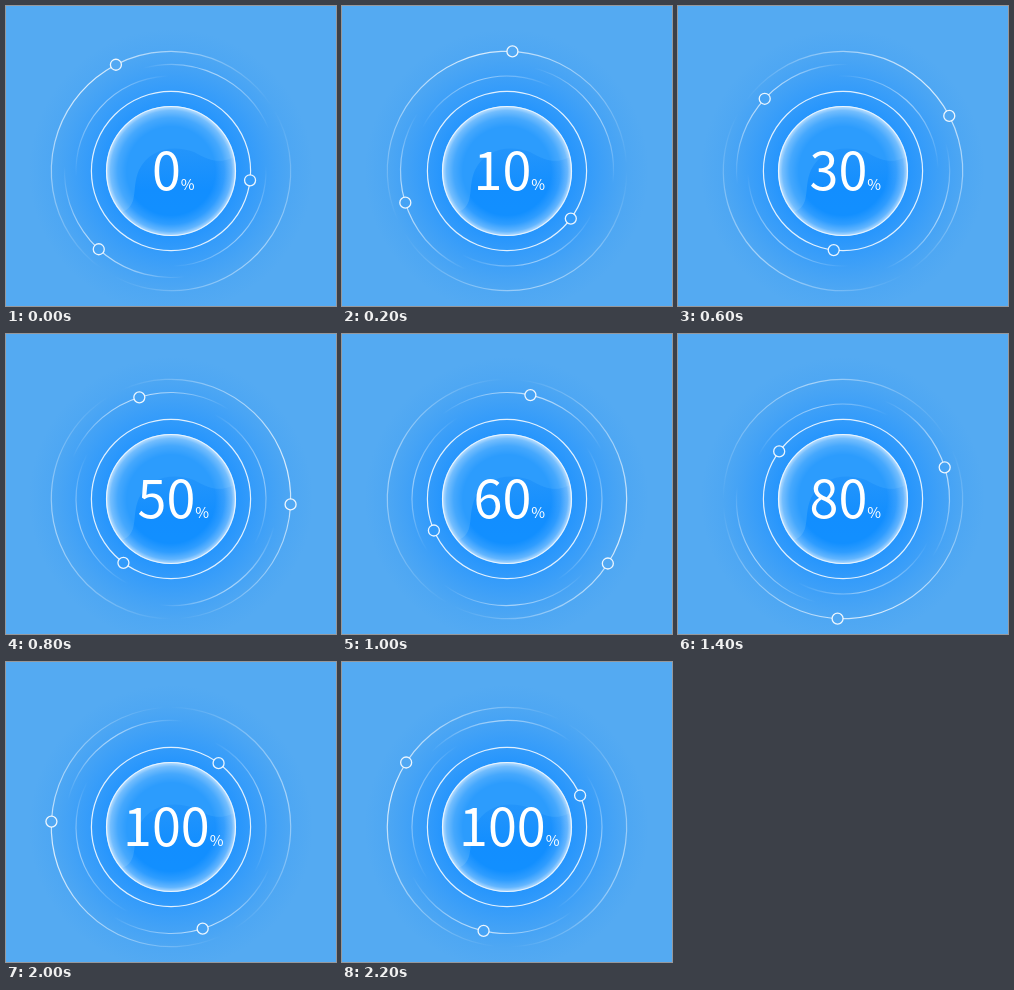
An HTML page with a canvas for the animation above (2600 ms loop, 330 by 300 pixels).

```html
<!DOCTYPE html>
<html lang="en">
<head>
<meta charset="utf-8">
<title>Progress orb</title>
<style>
html, body { margin: 0; width: 100%; height: 100%; overflow: hidden; background: #54aaf2; }
canvas { display: block; }
</style>
</head>
<body>
<canvas id="stage" width="330" height="300"></canvas>
<script>
const ctx = document.getElementById('stage').getContext('2d');
const C = 165, TAU = Math.PI * 2;
const LOOP = 2600, STEP = 200, LAST = 11;
const FONT = '"Noto Sans CJK SC", "Noto Sans CJK JP", "Noto Sans", sans-serif';
const rad = deg => deg * Math.PI / 180;
const white = a => `rgba(255,255,255,${a})`;

function radial(stops, r) {
  const g = ctx.createRadialGradient(C, C, 0, C, C, r);
  for (const [at, color] of stops) g.addColorStop(at, color);
  return g;
}

function disc(r, fill) {
  ctx.beginPath();
  ctx.arc(C, C, r, 0, TAU);
  ctx.fillStyle = fill;
  ctx.fill();
}

// Arc that is brightest in the middle and fades out at both ends.
function fadeArc(r, from, to, alpha) {
  const span = (to - from) / 360;
  const g = ctx.createConicGradient(rad(from), C, C);
  g.addColorStop(0, white(0));
  g.addColorStop(span * 0.28, white(alpha * 0.6));
  g.addColorStop(span * 0.5, white(alpha));
  g.addColorStop(span * 0.72, white(alpha * 0.6));
  g.addColorStop(span, white(0));
  ctx.beginPath();
  ctx.arc(C, C, r, rad(from), rad(to));
  ctx.strokeStyle = g;
  ctx.lineWidth = 1.2;
  ctx.stroke();
}

function dot(r, deg, fill) {
  ctx.beginPath();
  ctx.arc(C + r * Math.cos(rad(deg)), C + r * Math.sin(rad(deg)), 5.5, 0, TAU);
  ctx.fillStyle = fill;
  ctx.fill();
  ctx.strokeStyle = white(0.9);
  ctx.lineWidth = 1.3;
  ctx.stroke();
}

function rings(turn) {
  const outer = 242.6 + turn, mid = 132.7 + turn, inner = 6.7 + turn;
  fadeArc(119.7, outer - 117, outer + 84, 0.8);
  fadeArc(119.7, outer + 87, outer + 236, 0.5);
  fadeArc(106.5, mid - 50, mid + 50, 0.7);
  fadeArc(106.5, mid + 122, mid + 204, 0.55);
  fadeArc(95, mid + 44, mid + 136, 0.48);
  fadeArc(95, mid - 136, mid - 44, 0.48);
  ctx.beginPath();
  ctx.arc(C, C, 79.6, 0, TAU);
  ctx.strokeStyle = white(0.85);
  ctx.lineWidth = 1.2;
  ctx.stroke();
  dot(119.7, outer, '#51a8f3');
  dot(106.5, mid, '#46a3f5');
  dot(79.6, inner, '#329bfa');
}

function orb() {
  disc(65, '#2c9cfd');
  ctx.save();
  ctx.beginPath();
  ctx.arc(C, C, 65, 0, TAU);
  ctx.clip();
  ctx.beginPath();
  ctx.moveTo(108, 208);
  ctx.bezierCurveTo(136, 204, 124, 184, 133, 164);
  ctx.bezierCurveTo(143, 143, 167, 138, 188, 146);
  ctx.bezierCurveTo(204, 155, 213, 158, 228, 151);
  ctx.lineTo(232, 232);
  ctx.lineTo(108, 232);
  const wave = ctx.createLinearGradient(0, 142, 0, 225);
  wave.addColorStop(0, '#2495fb');
  wave.addColorStop(0.5, '#128eff');
  wave.addColorStop(1, '#1290ff');
  ctx.fillStyle = wave;
  ctx.fill();
  ctx.restore();
  disc(65, radial([[0, white(0)], [0.68, white(0)], [0.82, white(0.12)],
    [0.93, white(0.34)], [1, white(0.72)]], 65));
  ctx.beginPath();
  ctx.arc(C, C, 64.5, 0, TAU);
  ctx.strokeStyle = white(0.7);
  ctx.lineWidth = 1.2;
  ctx.stroke();
}

function label(value) {
  const big = `52px ${FONT}`, small = `15px ${FONT}`;
  ctx.font = small;
  const unit = ctx.measureText('%').width;
  ctx.font = big;
  const number = ctx.measureText(value).width;
  const x = 167.3 - (number + unit) / 2;
  ctx.fillStyle = '#fff';
  ctx.fillText(value, x, 184);
  ctx.font = small;
  ctx.fillText('%', x + number, 184);
}

function draw(step) {
  ctx.fillStyle = '#54aaf2';
  ctx.fillRect(0, 0, 330, 300);
  disc(142, radial([[0, '#1c90ff'], [0.45, '#2595fd'], [0.58, '#359cfa'],
    [0.72, '#43a2f6'], [0.85, '#4ea7f3'], [1, '#54aaf2']], 142));
  rings(step * 30);
  orb();
  label(String(Math.min(100, Math.floor(step * 1.25) * 10)));
}

const start = performance.now();
function tick() {
  const t = Math.max(0, performance.now() - start) % LOOP;
  draw(Math.min(LAST, Math.floor(t / STEP)));
  requestAnimationFrame(tick);
}
tick();
</script>
</body>
</html>
```
